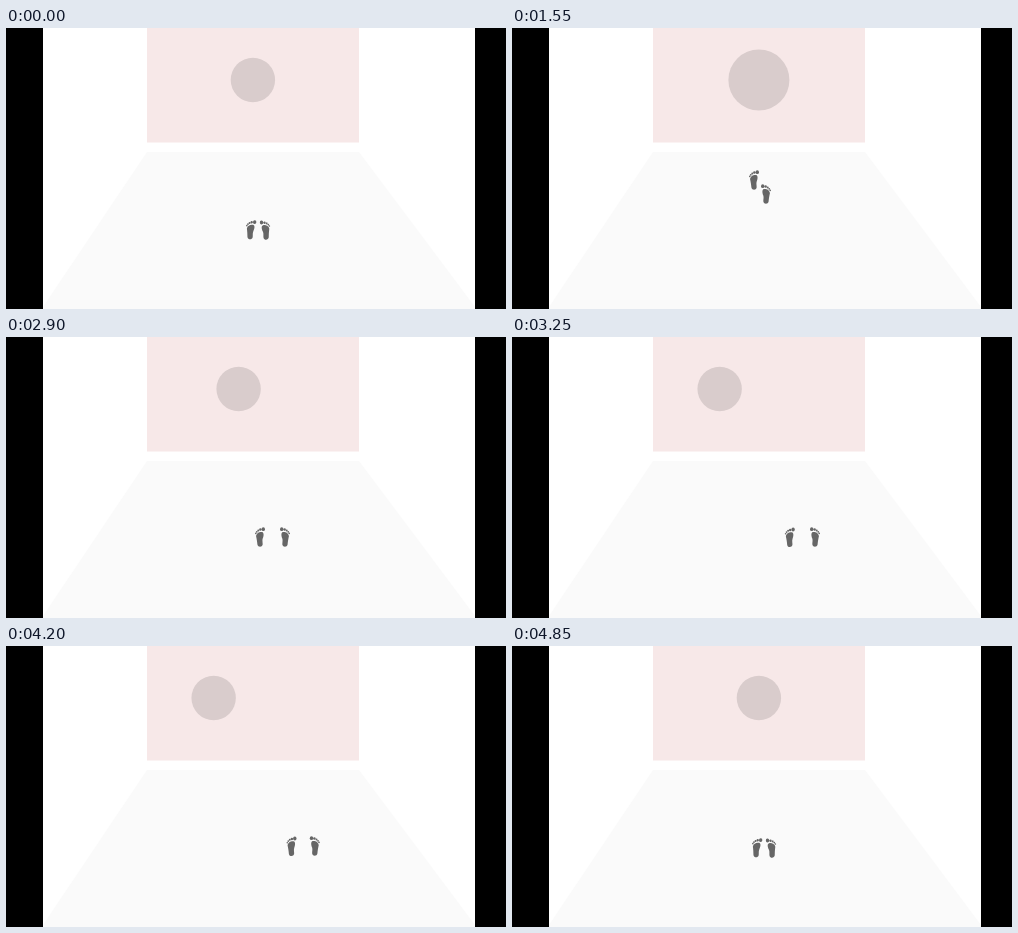
An HTML page that plays this animation: 500 by 281 pixels, repeating every 4.95 s.

```html
<!DOCTYPE html>
<html lang="en">
<head>
<meta charset="utf-8">
<title>Walking gains</title>
<style>
  html, body { margin: 0; width: 100%; height: 100%; overflow: hidden; background: #000; }
  svg { display: block; width: 100vw; height: 100vh; }
</style>
</head>
<body>
<svg viewBox="0 0 500 281" preserveAspectRatio="none">
  <defs>
    <g id="foot" fill="#666">
      <path d="M-3.9-.8C-3.7-4-.3-5.4 2-5C4.4-4.4 3.6-.5 2.7 1.6C2 3.6 2.9 6 2.6 7.8C2.1 10.4-2 10.5-2.6 7.6C-2.9 4.5-3.2 2.3-3.9-.8Z"/>
      <ellipse cx="3.3" cy="-7.8" rx="1.7" ry="1.9"/>
      <circle cx=".4" cy="-7.4" r="1.25"/>
      <circle cx="-1.7" cy="-6.5" r="1"/>
      <circle cx="-3.2" cy="-5.2" r=".9"/>
      <circle cx="-4.2" cy="-3.6" r=".8"/>
    </g>
  </defs>
  <rect x="37" width="432" height="281" fill="#fff"/>
  <rect x="141" width="212" height="114.5" fill="#f7e8e8"/>
  <path d="M141 124H353L469 279V281H37V279Z" fill="#fafafa"/>
  <circle id="ball" cy="52" fill="#d9cccc"/>
  <use class="foot" href="#foot"/>
  <use class="foot" href="#foot"/>
</svg>
<script>
const LOOP = 4950, SWING = 150, L = 0, R = 1;
const ball = document.getElementById('ball');
const feet = document.querySelectorAll('.foot');

// Resting pose of each foot: x, y, turn in degrees
const home = [[244.7, 201.6, 5], [259.5, 202, -5]];

// Footsteps: landing time, foot, x, y, turn
const steps = [
  // forward
  [350, R, 257, 190, 0], [550, L, 243, 178, 0], [750, R, 255, 165, 0],
  [1000, L, 242, 152, 0], [1250, R, 254, 152, 0],
  // backward
  [1550, R, 254, 166, 0], [1750, L, 242, 178, 0], [1950, R, 254.5, 191, 0],
  [2200, L, 242, 200, 0], [2450, R, 254.3, 200, 0],
  // to the right
  [2800, R, 279, 200, 0], [2950, L, 260, 200, 0], [3100, R, 303, 200, 0],
  [3250, L, 277.8, 200.3, 0], [3450, R, 328, 200, 0], [3650, L, 315, 200, 0],
  // to the left
  [4000, L, 285.5, 200.3, 0], [4150, R, 308.8, 200, 0], [4350, L, 265, 200, 0],
  [4550, R, 285, 200, 0], [4700, L, ...home[L]], [4850, R, ...home[R]]
];

const clamp = v => Math.min(1, Math.max(0, v));

// Half linear, half sine ease
function glide(t, start, end) {
  const p = clamp((t - start) / (end - start));
  return (p + (1 - Math.cos(Math.PI * p)) / 2) / 2;
}

function pose(foot, t) {
  let at = home[foot];
  for (const [land, side, ...to] of steps) {
    if (side !== foot) continue;
    const p = clamp((t - land + SWING) / SWING);
    at = at.map((v, i) => v + (to[i] - v) * p);
  }
  return at;
}

// The picture advances in 50 ms ticks, 100 ms while walking forward
function tick(t) {
  return t < 1350 ? Math.max(0, Math.floor((t - 50) / 100) * 100 + 50)
                  : Math.floor(t / 50) * 50;
}

function draw(now) {
  const t = tick(now % LOOP);
  const near = glide(t, 150, 1250) - glide(t, 1400, 2450);
  const side = glide(t, 2600, 3650) - glide(t, 3800, 4850);
  ball.setAttribute('r', 22.2 + 9.2 * near);
  ball.setAttribute('cx', 246.9 - 60.3 * side);
  feet.forEach((el, i) => {
    const [x, y, turn] = pose(i, t);
    el.setAttribute('transform',
      `translate(${x} ${y}) rotate(${turn}) scale(${i === R ? -1 : 1} 1)`);
  });
}

const begin = performance.now();
function loop() {
  draw(performance.now() - begin);
  requestAnimationFrame(loop);
}
loop();
</script>
</body>
</html>
```
